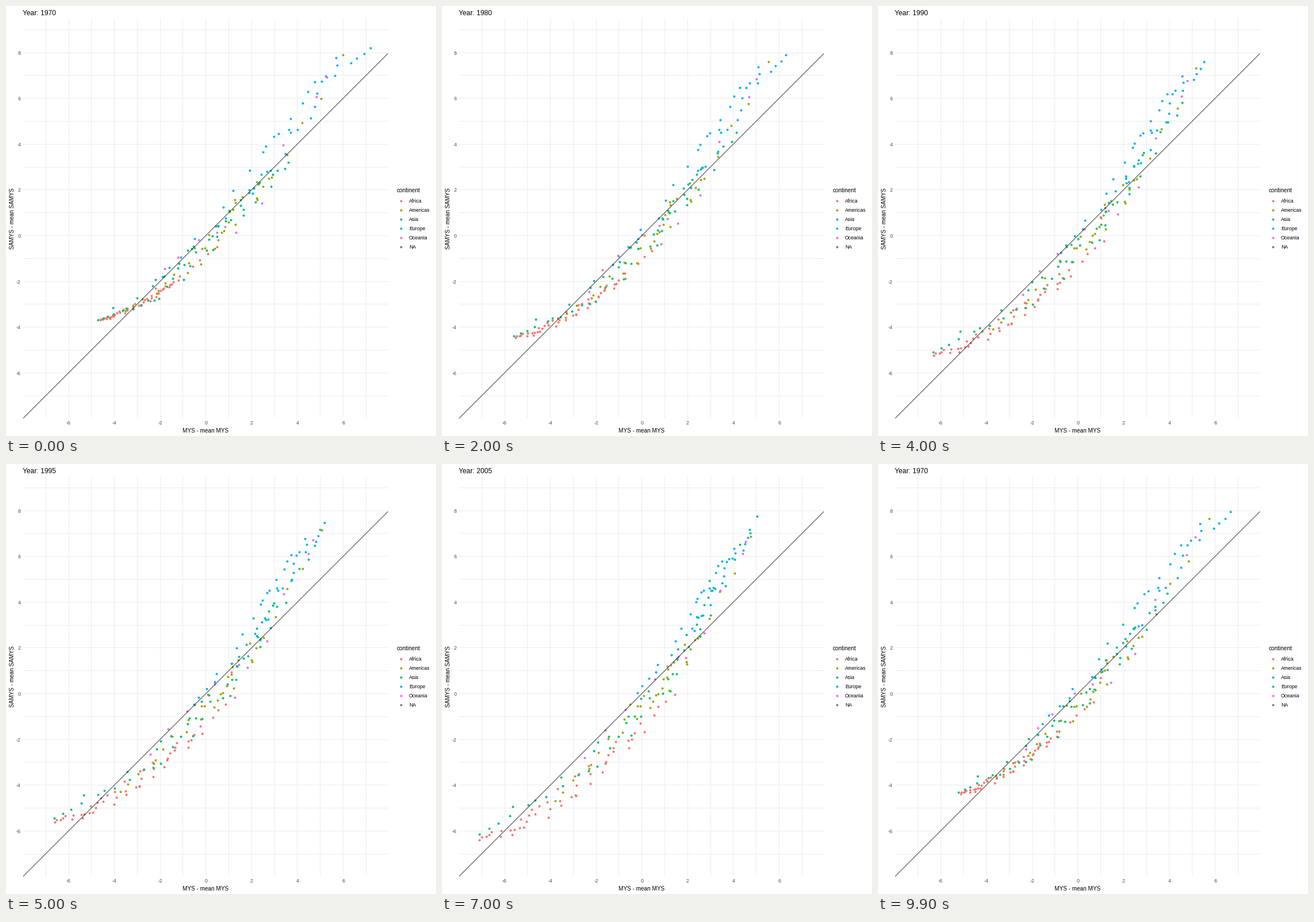
A matplotlib script for the animation above (10000 ms loop, 748 by 748 pixels).

```python
import numpy as np
import matplotlib.pyplot as plt
from matplotlib.animation import FuncAnimation

SIZE, DPI = 748, 64
PT = 72 / DPI                    # points per pixel
X0, Y0, UNIT = 347.3, 399, 39.8  # axis origin and unit in pixels
LEFT, RIGHT, TOP, BOTTOM = 30, 664, 22, 715
YEARS = range(1970, 2016, 5)
HOLD, MOVE = 5, 5                # ticks of 100 ms per state
STEPS = HOLD + MOVE

plt.rcParams["font.family"] = "Liberation Sans"
rng = np.random.default_rng(7)

# Each continent is a band of countries along a path through five points,
# given for 1970 and 2010; QUANTILES says which share lies below each point.
QUANTILES = [0, 0.25, 0.6, 0.9, 1]
# name: (colour, countries, band width in 1970 and 2010, path 1970, path 2010)
GROUPS = {
    "Africa": ("#F8766D", 50, (0.08, 0.35),
               [(-4.6, -3.7), (-4.0, -3.5), (-2.5, -2.8), (-1.3, -2.0), (0.5, -0.5)],
               [(-7.2, -6.8), (-5.1, -6.0), (-2.5, -3.8), (0.0, -1.6), (1.5, 0.0)]),
    "Americas": ("#A3A500", 35, (0.3, 0.3),
                 [(-3.5, -3.3), (-0.5, -1.1), (1.2, 1.0), (3.0, 2.7), (6.0, 7.9)],
                 [(-3.8, -4.9), (-0.5, -0.9), (1.1, 0.5), (2.5, 2.6), (4.7, 6.7)]),
    "Asia": ("#00BF7D", 50, (0.35, 0.35),
             [(-4.7, -3.7), (-2.2, -2.5), (0.4, -0.1), (2.6, 2.2), (3.6, 3.2)],
             [(-7.2, -6.5), (-2.0, -2.9), (1.5, 0.9), (3.4, 4.9), (5.1, 8.4)]),
    "Europe": ("#00B0F6", 39, (0.35, 0.25),
               [(-1.9, -1.8), (1.9, 2.3), (4.0, 5.0), (5.9, 7.6), (7.2, 8.2)],
               [(-0.1, 0.3), (2.2, 3.2), (3.1, 4.8), (4.1, 6.0), (4.6, 7.0)]),
    "Oceania": ("#E76BF3", 11, (0.4, 0.2),
                [(-2.2, -2.3), (-0.7, -0.2), (1.3, 0.4), (5.0, 5.8), (5.3, 6.9)],
                [(-2.5, -2.9), (0.3, 0.6), (2.0, 2.0), (4.5, 6.0), (4.5, 6.6)]),
}


def to_pixels(x, y):
    return X0 + x * UNIT, Y0 - y * UNIT


def along(path, u):
    return np.array([np.interp(u, QUANTILES, axis) for axis in zip(*path)])


def group_states(count, widths, first, last):
    """Pixel positions of one continent, shape (years, countries, 2)."""
    u = np.linspace(0, 1, count)
    taper = 2 * np.sqrt(u * (1 - u))
    u = np.clip(u + taper * rng.normal(0, 0.4 / count, count), 0, 1)
    side = taper * rng.uniform(-1, 1, count)
    start, end = along(first, u), along(last, u)
    states = []
    for year in YEARS:
        t = (year - 1970) / 40
        ease = 1 - max(0, 1 - t) ** 1.5
        width = widths[0] + t * (widths[1] - widths[0])
        x = start[0] + ease * (end[0] - start[0]) + width * side
        y = start[1] + t * (end[1] - start[1]) - width * side
        states.append(np.transpose(to_pixels(x, y)))
    return np.array(states)


states = np.concatenate([group_states(*g[1:]) for g in GROUPS.values()], axis=1)
colors = [g[0] for g in GROUPS.values() for _ in range(g[1])]

fig = plt.figure(figsize=(SIZE / DPI, SIZE / DPI), dpi=DPI, facecolor="white")
ax = fig.add_axes([0, 0, 1, 1])
ax.set_xlim(0, SIZE)
ax.set_ylim(SIZE, 0)
ax.axis("off")


def label(x, y, text, size, color="black", **kw):
    return ax.text(x, y, text, fontsize=size * PT, color=color, **kw)


def dots(points, color):
    return ax.scatter(*np.transpose(points), s=(4 * PT) ** 2, c=color,
                      linewidths=0, zorder=3)


def grid_line(xs, ys):
    ax.plot(xs, ys, color="#EBEBEB", lw=PT, zorder=1)


for v in range(-7, 10):
    x, y = to_pixels(v, v)
    grid_line([LEFT, RIGHT], [y, y])
    if v % 2 == 0:
        label(25.5, y + 4, str(v), 8.8, "#4D4D4D", ha="right")
    if v <= 7:
        grid_line([x, x], [TOP, BOTTOM])
        if v % 2 == 0:
            label(x + 0.5, 728.5, str(v), 8.8, "#4D4D4D", ha="center")

# Identity line, running through pixel centres
ends = np.array([LEFT, RIGHT])
ax.plot(ends, SIZE - 1 - ends, color="black", lw=0.75 * PT, zorder=4)

label(347, 741.5, "MYS - mean MYS", 10, ha="center")
label(14.5, 370, "SAMYS - mean SAMYS", 10, rotation=90, ha="center",
      rotation_mode="anchor")
title = label(29.5, 16, "", 12)

label(680, 324, "continent", 10)
legend = [(name, g[0]) for name, g in GROUPS.items()] + [("NA", "#7F7F7F")]
for i, (name, color) in enumerate(legend):
    y = 338 + 16 * i
    dots([(687.5, y + 0.5)], color)
    label(701, y + 3.5, name, 8.8)

cloud = dots(states[0], colors)


def draw(frame):
    state, tick = divmod(frame, STEPS)
    after = (state + 1) % len(YEARS)
    t = max(0, tick - HOLD) / MOVE
    points = states[state] * (1 - t) + states[after] * t
    cloud.set_offsets(np.round(points) + 0.5)
    title.set_text(f"Year: {YEARS[after if t > 0.5 else state]}")
    return cloud, title


anim = FuncAnimation(fig, draw, frames=len(YEARS) * STEPS, interval=100,
                     init_func=lambda: draw(0), repeat=True, repeat_delay=0)
plt.show()
```
